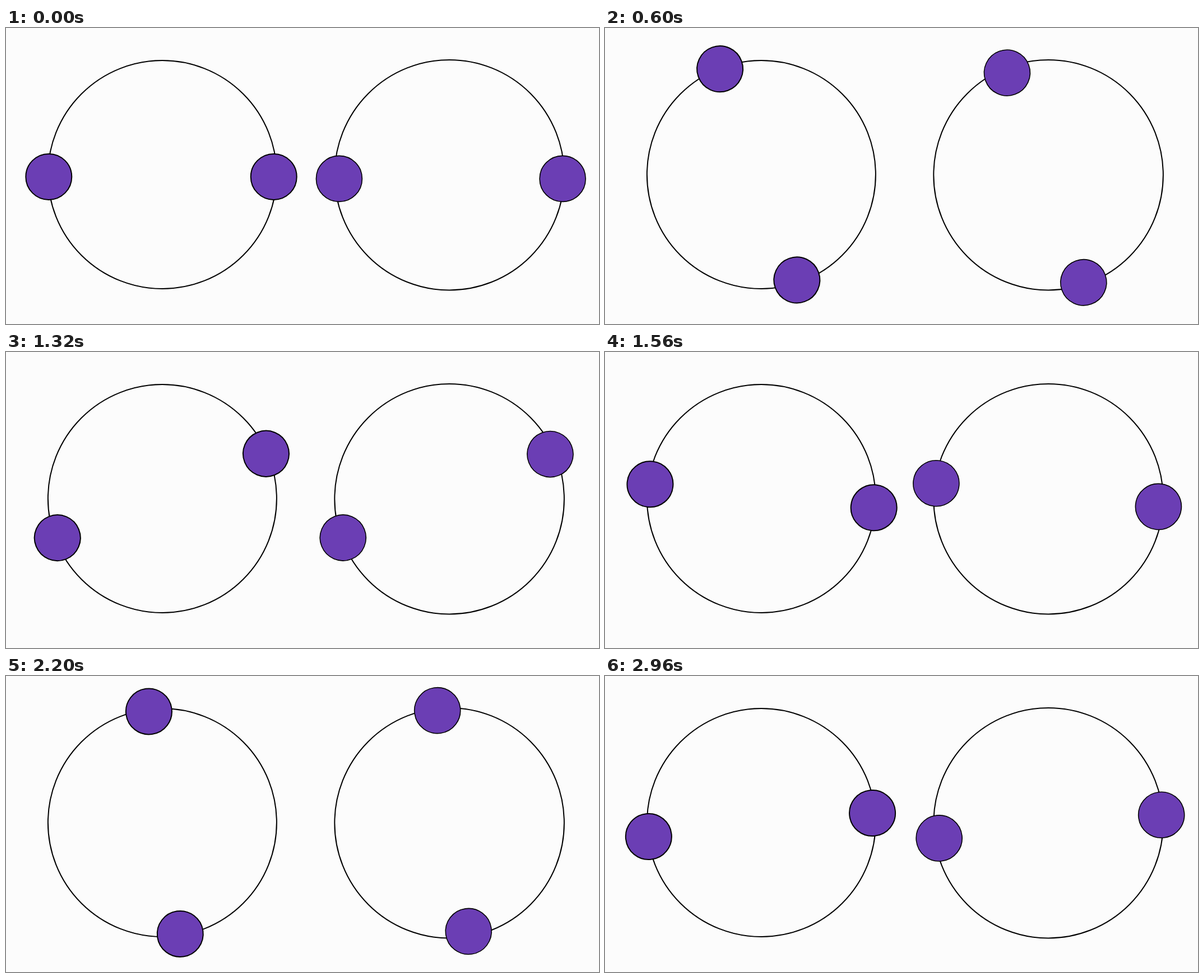
Animation of 1058 by 529 pixels, one loop 3 s. Source, as an HTML page:

```html
<!DOCTYPE html>
<html lang="en">
<head>
<meta charset="utf-8">
<title>Rotating pairs</title>
<style>
  html, body { margin: 0; width: 100%; height: 100%; overflow: hidden; background: #fcfcfc; }
  svg { display: block; width: 100%; height: 100%; }
  ellipse { fill: none; stroke: #000; stroke-width: 2; }
  circle { fill: #6b3eb4; stroke: #000; }
</style>
</head>
<body>
<svg viewBox="0 0 1058 529">
  <ellipse cx="278.9" cy="262" rx="204" ry="204"/>
  <ellipse cx="791.1" cy="262.7" rx="204.8" ry="205.8"/>
  <g data-pivot="278.3 261.5" stroke-width="2">
    <circle cx="76.3" cy="265.9" r="41"/>
    <circle cx="477.7" cy="265.9" r="41"/>
  </g>
  <g data-pivot="791.1 262.6" style="--line: 1.5">
    <circle cx="594.4" cy="269.4" r="41" stroke-width="1.6"/>
    <circle cx="993.1" cy="269.4" r="41" stroke-width="1.6"/>
  </g>
</svg>
<script>
  const LOOP = 3000, STEP = 40;
  const pairs = document.querySelectorAll('g');

  // One turn per loop in 2-degree ticks at 60 per second, shown every 40 ms.
  function angleAt(time) {
    const step = Math.floor(((time + 1) % LOOP) / STEP);
    return 2 * Math.max(0, Math.ceil(step * 12 / 5) - 1);
  }

  function draw(time) {
    const angle = angleAt(time);
    for (const pair of pairs) {
      pair.setAttribute('transform', `rotate(${angle} ${pair.dataset.pivot})`);
    }
    requestAnimationFrame(draw);
  }

  draw(0);
</script>
</body>
</html>
```
